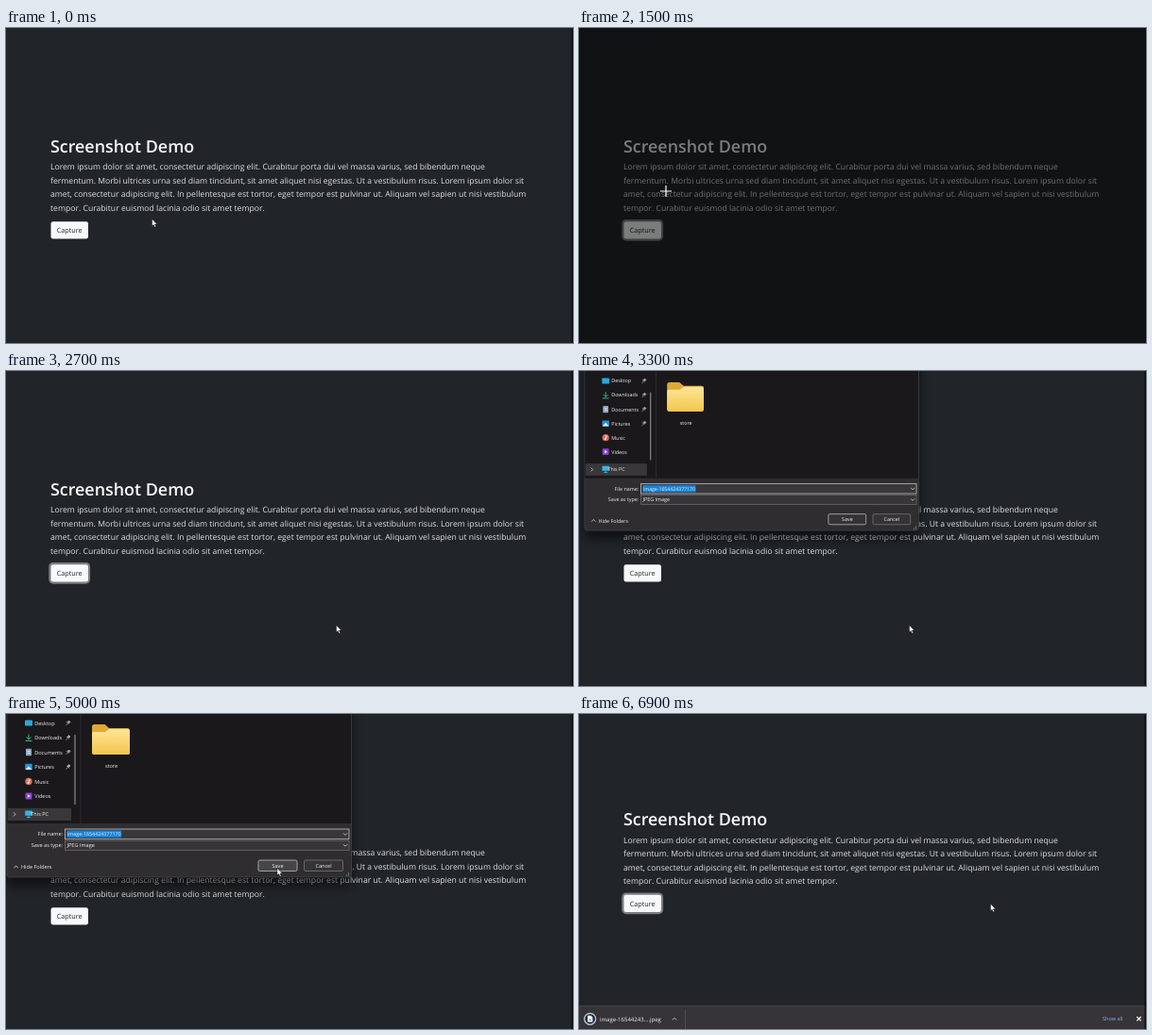
Animation, 600 px wide and 334 px high, one loop 7000 ms. Source, as an HTML page:

```html
<!DOCTYPE html>
<html lang="en">
<head>
<meta charset="utf-8">
<title>Screenshot Demo</title>
<style>
html, body { margin: 0; width: 100%; height: 100%; overflow: hidden; background: #212529; }
svg { display: block; width: 600px; height: 334px; }
text { font-family: "Open Sans", "Noto Sans", sans-serif; text-rendering: geometricPrecision; white-space: pre; }
.body { font-size: 8.64px; fill: #f8f9fa; fill-opacity: .88; }
.ui { font-size: 5.55px; fill: #f2f2f2; }
.line { fill: none; stroke: #ddd; stroke-width: .8; }
</style>
</head>
<body>
<svg viewBox="0 0 600 334">
  <defs>
    <filter id="blur" x="-20%" y="-20%" width="140%" height="150%"><feGaussianBlur stdDeviation="7"/></filter>
    <linearGradient id="gold" x2="0" y2="1"><stop stop-color="#ffe596"/><stop offset="1" stop-color="#f3c64e"/></linearGradient>
  </defs>
  <rect width="600" height="334" fill="#212529"/>

  <g id="page">
    <text x="47" y="131.6" font-size="17.9" font-weight="600" fill="#f8f9fa">Screenshot Demo</text>
    <g id="copy" class="body"></g>
    <rect id="ring" x="45.3" y="202.9" width="43.8" height="22.8" rx="4.6" fill="#d3d4d5" fill-opacity=".5"/>
    <rect x="47.5" y="205.2" width="39.5" height="18.4" rx="2.4" fill="#f8f9fa"/>
    <text x="53.7" y="217.4" font-size="7.23" fill="#212529">Capture</text>
  </g>

  <path id="shade" fill-opacity=".5" fill-rule="evenodd"/>

  <g id="dialog">
    <rect x="1" y="-30" width="364" height="212" fill-opacity=".6" filter="url(#blur)"/>
    <rect x="1" y="-40" width="364.5" height="213" rx="3" fill="#2f2d2f" stroke="#49474a" stroke-width=".7"/>
    <rect x="1.4" y="-39" width="363.7" height="155" fill="#1a181b"/>
    <path d="M79 -30V116" stroke="#333135" stroke-width=".8"/>
    <path d="M73 22V96" stroke="#a0a0a0" stroke-width="1"/>
    <rect x="2" y="99.8" width="67" height="13.2" fill="#393739"/>
    <g id="places"></g>
    <path class="line" d="M8 104.4l2 2-2 2"/>
    <rect x="20.2" y="102.6" width="7.6" height="5.2" rx=".6" fill="#35b5ea"/>
    <path d="M24 107.8v1.6M22 109.6h4" stroke="#35b5ea"/>
    <text class="ui" x="30" y="108.3" id="pc" transform="translate(-3.7)">This PC</text>

    <path d="M91 13.5q0-2.5 2.5-2.5h11l4.5 4h19.500q2.500 0 2.500 2.500v23q0 2.500-2.500 2.500h-35q-2.500 0-2.500-2.500z" fill="#e0a934"/>
    <path d="M91 21q0-2 2-2h12l4-3h19.500q2.500 0 2.500 2.500v22q0 2.500-2.500 2.500h-35q-2.500 0-2.500-2.500z" fill="url(#gold)"/>
    <text class="ui" x="111.500" y="57.200" text-anchor="middle">store</text>

    <text class="ui" x="60" y="129.200" text-anchor="end">File name:</text>
    <rect x="62.500" y="122" width="300.500" height="10.700" fill="#393739" stroke="#c4c4c4" stroke-width=".8"/>
    <rect x="64.500" y="123.500" width="57.700" height="7.600" fill="#1683d8"/>
    <text class="ui" x="65" y="129.200" style="font-size:5.35px">image-1654424377170</text>
    <text class="ui" x="60" y="141.400" text-anchor="end">Save as type:</text>
    <rect x="62.500" y="134.200" width="300.500" height="10.200" fill="#373537" stroke="#737173" stroke-width=".7"/>
    <text class="ui" x="64.500" y="141.400">JPEG Image</text>
    <path class="line" d="M357 126.400l2 2 2-2M357 138.300l2 2 2-2M8.500 163.200l2.200-2.200 2.200 2.200"/>
    <text class="ui" x="16" y="164.200">Hide Folders</text>
    <rect id="save" x="267" y="155" width="41" height="11.500" rx="1.500" stroke="#bdbdbd" stroke-width=".8"/>
    <text class="ui" x="287.500" y="162.600" text-anchor="middle">Save</text>
    <rect x="315.500" y="155" width="41" height="11.500" rx="1.500" fill="#353335" stroke="#777" stroke-width=".8"/>
    <text class="ui" x="336" y="162.600" text-anchor="middle">Cancel</text>
    <path d="M360 171h1M362 171h1M362 169h1" stroke="#aaa"/>
  </g>

  <g id="drop">
    <circle r="16.800" fill="#fff" fill-opacity=".75"/>
    <path d="M-2.500-7h5v5h4L0 5-6.500-2h4zM-7 8H7" fill="#fff" stroke="#fff"/>
  </g>

  <g id="shelf">
    <rect y="309.500" width="600" height="25" fill="#363436"/>
    <path d="M0 309.700H600" stroke="#4b494b" stroke-width=".8"/>
    <circle cx="11.700" cy="323.300" r="6" fill="#262a30" stroke="#48545f" stroke-width="1.200"/>
    <circle id="progress" cx="11.700" cy="323.300" r="6" fill="none" stroke="#b5d2ef" stroke-width="1.200" pathLength="1" transform="rotate(-90 11.700 323.300)"/>
    <path d="M9.200 319.800h3.400l1.800 1.800v5h-5.200z" fill="#fff"/>
    <path d="M10.400 324.800l1.400-1.600 1.400 1.600z" fill="#333"/>
    <text class="ui" x="22" y="325.500" style="font-size:6.030px">image-16544243....jpeg</text>
    <path class="line" d="M98.800 324.500l2.200-2.200 2.200 2.200" stroke-width="1"/>
    <path d="M112.500 313V334" stroke="#565456" stroke-width=".8"/>
    <text class="ui" x="554" y="325.400" style="fill:#8ab4f8">Show all</text>
    <path class="line" d="M590.300 321l4.400 4.400m0-4.400l-4.400 4.400" style="stroke:#fff;stroke-width:1.100px"/>
  </g>

  <rect x="598.600" width="1.400" height="334" fill="#0c0d0f"/>

  <g id="cursor">
    <path data-kind="arrow" d="M0 0V7.600L1.700 6.100 2.900 8.800 4.200 8.200 3 5.600H5.300Z" fill="#fff" stroke="#111" stroke-width=".5"/>
    <path data-kind="hand" d="M-.9.600Q0-.7.900.600V4L4.800 5Q5.500 5.300 5.300 6.500L4.600 10.500H-.7L-3 6.700Q-2.700 5.400-.9 6.700Z" fill="#fff" stroke="#222" stroke-width=".7"/>
    <path data-kind="cross" d="M-6 0H6M0-6V6" stroke="#fff" stroke-width="1.200"/>
    <path data-kind="beam" d="M-1.700-3.800H1.700M0-3.800V3.800M-1.700 3.800H1.700" stroke="#ddd" stroke-width=".8"/>
  </g>
</svg>

<script>
const $ = id => document.getElementById(id);
const LOOP = 7000, STEP = 100;

const copy = [
  "Lorem ipsum dolor sit amet, consectetur adipiscing elit. Curabitur porta dui vel massa varius, sed bibendum neque",
  "fermentum. Morbi ultrices urna sed diam tincidunt, sit amet aliquet nisi egestas. Ut a vestibulum risus. Lorem ipsum dolor sit",
  "amet, consectetur adipiscing elit. In pellentesque est tortor, eget tempor est pulvinar ut. Aliquam vel sapien ut nisi vestibulum",
  "tempor. Curabitur euismod lacinia odio sit amet tempor."
];
$("copy").innerHTML = copy.map((s, i) => `<text x="47" y="${150.4 + i * 14.5}">${s}</text>`).join("");

const icons = {
  Desktop: '<rect x="-4" y="-3" width="8" height="6" rx=".8" fill="#25a8e0"/>',
  Downloads: '<path d="M0-3.500V2M-2.500-.5L0 2 2.500-.5M-3.500 3.500h7" fill="none" stroke="#35b98a"/>',
  Documents: '<rect x="-3" y="-3.700" width="6" height="7.400" rx=".7" fill="#8fa9c0"/><path d="M-1.500-1h3M-1.500 1h3" stroke="#fff" stroke-width=".7"/>',
  Pictures: '<rect x="-3.800" y="-3.200" width="7.600" height="6.400" rx=".8" fill="#2492d3"/><path d="M-3.500 3L0-.8 3.500 3z" fill="#d8f1ff"/>',
  Music: '<circle r="3.700" fill="#d9705c"/><path d="M.3 1.500V-2l1.500.7" fill="none" stroke="#fff" stroke-width=".8"/><circle cx="-.5" cy="1.500" r="1" fill="#fff"/>',
  Videos: '<rect x="-3.500" y="-3.500" width="7" height="7" rx="1" fill="#8a43d6"/><path d="M-1-1.700L1.800 0-1 1.700z" fill="#fff"/>'
};
$("places").innerHTML = Object.entries(icons).map(([name, icon], i) => `<g transform="translate(24 ${9.5 + i * 15.5})">
  ${icon}<text class="ui" x="6.200" y="2">${name}</text>
  ${i < 4 ? '<path d="M39.500 2.500L41 1M40-1l2.500 2.500M41-1l1.500-1.500 1.500 1.500L42.500.5z" fill="#aaa" stroke="#aaa" stroke-width=".8"/>' : ""}</g>`).join("");

// Linear interpolation through [time, ...values] keys.
function at(keys, t) {
  if (t <= keys[0][0]) return keys[0].slice(1);
  for (let i = 1; i < keys.length; i++) {
    const a = keys[i - 1], b = keys[i];
    if (t <= b[0]) return a.slice(1).map((v, j) => v + (b[j + 1] - v) * (t - a[0]) / (b[0] - a[0]));
  }
  return keys.at(-1).slice(1);
}

const pointer = [
  [0, 154.5, 202.5], [400, 114, 211], [800, 74, 216], [1000, 70, 213.5], [1400, 70, 213.5],
  [1700, 136, 92], [1800, 136, 92], [2300, 305.5, 248.8], [2500, 349.5, 269.5], [4100, 349.5, 269.5],
  [4500, 318, 212], [4900, 287, 163.5], [5300, 287, 163.5], [5500, 285.5, 156.5],
  [6200, 285.5, 156.5], [6400, 340, 178], [6700, 435.5, 201.2]
];
const corner = [[1800, 136, 92], [2300, 295.5, 244], [2500, 346, 268]];
const dialogKeys = [[3100, .9, 0], [3200, .93, .5], [3300, .97, 1], [3400, 1, 1], [5400, 1, 1], [5600, .97, .55], [5700, .95, .15], [5800, .94, 0]];
const dropKeys = [[5500, 278, 0], [5700, 288, .16], [5900, 304, .5], [6100, 320, 0]];
const shelfKeys = [[5800, 0], [6100, 1]];

function cursorKind(t, x, y) {
  if (t < 1400) return x < 87 ? "hand" : "arrow";
  if (t < 2600) return "cross";
  return t >= 5500 && y < 184 ? "beam" : "arrow";
}

const show = (el, on) => el.style.display = on ? "" : "none";

function draw(t) {
  const [x, y] = at(pointer, t), kind = cursorKind(t, x, y);
  $("cursor").setAttribute("transform", `translate(${x} ${y})`);
  for (const el of $("cursor").children) show(el, el.dataset.kind === kind);

  const [cx, cy] = at(corner, t);
  show($("shade"), t >= 1400 && t < 2600);
  $("shade").setAttribute("d", `M0 0H600V334H0ZM136 92H${cx}V${cy}H136Z`);
  show($("ring"), t >= 1400 && t < 3200 || t >= 5500);

  const [scale, alpha] = at(dialogKeys, t);
  show($("dialog"), alpha > 0);
  $("dialog").setAttribute("opacity", alpha);
  $("dialog").setAttribute("transform", `translate(165 43) scale(${scale}) translate(-165 -43)`);
  $("save").setAttribute("fill", t >= 4900 ? "#474547" : "#353335");

  const [dropY, dropAlpha] = at(dropKeys, t);
  $("drop").setAttribute("transform", `translate(15.300 ${dropY})`);
  $("drop").setAttribute("opacity", dropAlpha);

  const [rise] = at(shelfKeys, t);
  $("page").setAttribute("transform", `translate(0 ${-13.5 * rise})`);
  $("shelf").setAttribute("transform", `translate(0 ${25 * (1 - rise)})`);
  show($("shelf"), rise > 0);
  $("progress").setAttribute("stroke-dasharray", `${at([[6000, .2], [6600, 1]], t)[0]} 1`);
}

function tick() {
  draw(Math.floor(performance.now() % LOOP / STEP) * STEP);
  requestAnimationFrame(tick);
}
tick();
</script>
</body>
</html>
```
